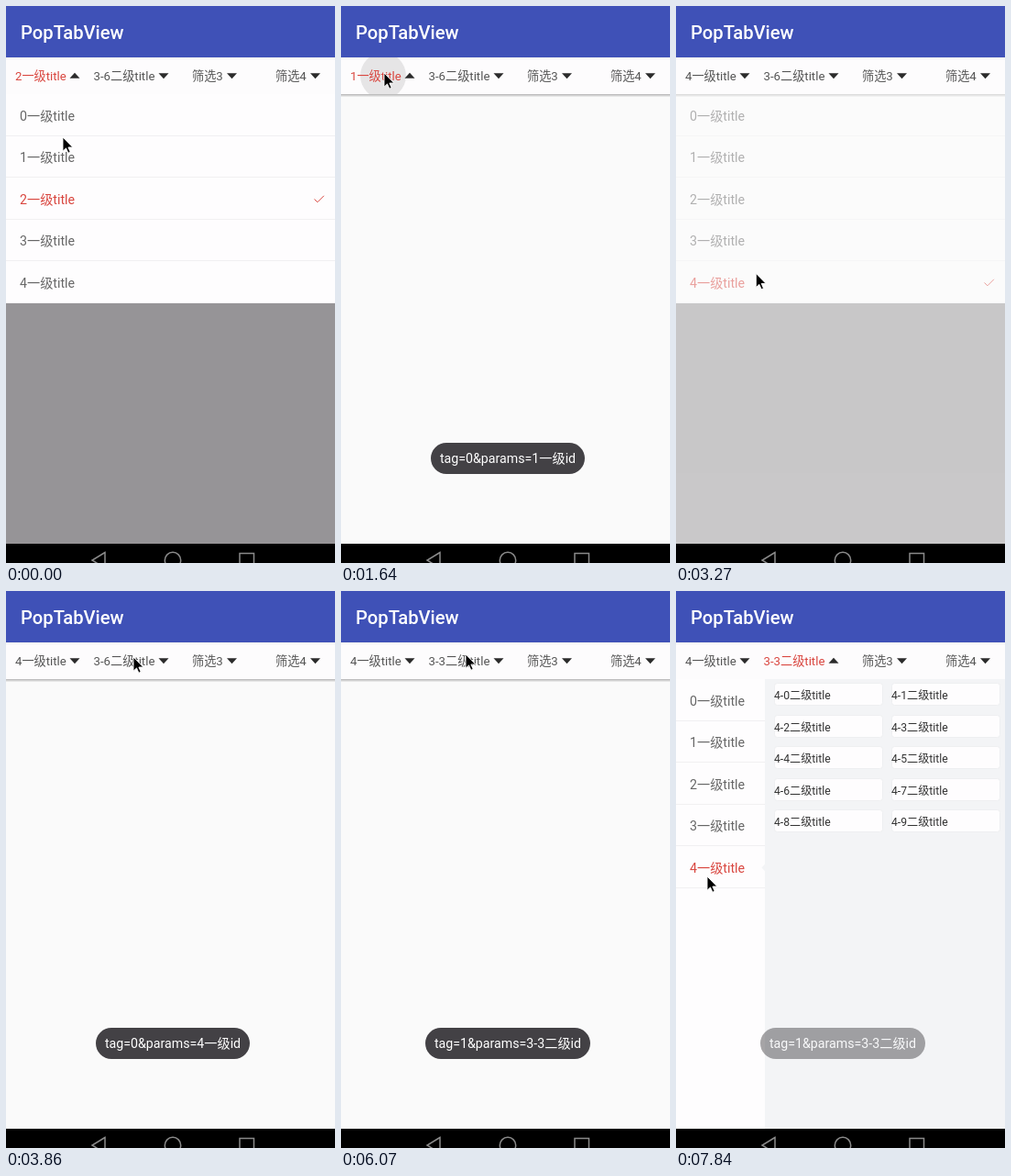
Recreate the animation shown at these times as an HTML page. Size 359x607 px, loop 7990 ms.

```html
<!DOCTYPE html>
<html lang="zh">
<head>
<meta charset="utf-8">
<title>PopTabView</title>
<style>
html, body { margin: 0; width: 100%; height: 100%; overflow: hidden; background: #fafafa; }
svg { display: block; width: 100%; height: 100%; font-family: Roboto, "Noto Sans CJK SC", "Noto Sans CJK", sans-serif; }
</style>
</head>
<body>
<svg id="stage" viewBox="0 0 359 607">
  <defs>
    <linearGradient id="shade" x2="0" y2="1">
      <stop stop-color="#000" stop-opacity=".28"/>
      <stop offset="1" stop-color="#000" stop-opacity="0"/>
    </linearGradient>
    <clipPath id="bar"><rect y="56" width="359" height="40"/></clipPath>
  </defs>
</svg>
<script>
const LOOP = 7990, STEP = 147.85;
const RED = '#d9463f', WHITE = '#fefdfe', LINE = '#f1f0f2', PANEL = '#f3f4f6';
const ROW = 45.5, TOP = 96;
const stage = document.getElementById('stage');

function add(parent, tag, attrs, text) {
  const node = document.createElementNS('http://www.w3.org/2000/svg', tag);
  set(node, attrs);
  if (text) node.textContent = text;
  parent.appendChild(node);
  return node;
}
function set(node, attrs) {
  for (const k in attrs) node.setAttribute(k, attrs[k]);
}
const rect = (p, x, y, width, height, fill, more) =>
  add(p, 'rect', { x, y, width, height, fill, ...more });
const label = (p, x, y, size, fill, text, more) =>
  add(p, 'text', { x, y, 'font-size': size, fill, ...more }, text);
const group = (p = stage) => add(p, 'g', {});
const clamp = v => Math.max(0, Math.min(1, v));
const rowMid = i => TOP + ROW * i + 23.5;

// Column of five first-level rows; returns the text nodes.
function makeList(parent, width) {
  return [0, 1, 2, 3, 4].map(i => {
    rect(parent, 0, Math.floor(TOP + ROW * (i + 1) - 0.5), width, 1, LINE);
    return label(parent, 15, Math.round(TOP + ROW * i + 28.9), 14.2, '#666', i + '一级title');
  });
}
const paintList = (rows, sel) => rows.forEach((r, i) => set(r, { fill: i === sel ? RED : '#666' }));

rect(stage, 0, 0, 359, 607, '#fafafa');
rect(stage, 0, 96, 359, 3.5, 'url(#shade)');

// Single list popup
const single = group();
rect(single, 0, 324, 359, 262, '#969497');
rect(single, 0, 96, 359, 228, WHITE);
const rows = makeList(single, 359);
const check = add(single, 'path', { d: 'M336.5 0l3.4 3.3 7-7', fill: 'none', stroke: RED, 'stroke-width': 1 });

// Two-level popup
const double = group();
rect(double, 0, 96, 359, 490, PANEL);
rect(double, 0, 96, 97, 490, WHITE);
const side = makeList(double, 97);
const notch = add(double, 'path', { d: 'M97.5-4.5L93.5 0l4 4.5z', fill: PANEL });
const cells = Array.from({ length: 10 }, (_, i) => {
  const x = i % 2 ? 235.5 : 107.5, base = Math.round(118.4 + 34.4 * (i >> 1));
  return {
    box: rect(double, x, base - 17.5, 118, 24, WHITE, { rx: 3 }),
    text: label(double, x - 0.5, base, 12.15, '#333')
  };
});

// Header and tabs
rect(stage, 0, 56, 359, 40, '#fdfcfd');
rect(stage, 0, 56, 359, 3, 'url(#shade)', { opacity: 0.2 });
rect(stage, 0, 0, 359, 56, '#3f51b7');
label(stage, 16, 35.5, 20.2, '#fff', 'PopTabView', { 'font-weight': 500 });
const ripple = add(stage, 'circle', { cx: 46, cy: 76, r: 25, opacity: 0.09, 'clip-path': 'url(#bar)' });
const tabs = [[10, 75], [95.5, 172], [203, 246.5], [294, 337.5]].map(([x, ax], i) => ({
  ax,
  text: label(stage, x, 81, 13.2, '#555', '筛选' + (i + 1)),
  arrow: add(stage, 'path', { d: 'M-5.5-2.8h11L0 3.2z', fill: '#2b2b2b' })
}));
function paintTab(i, open, text) {
  const tab = tabs[i];
  if (text) tab.text.textContent = text;
  set(tab.text, { fill: open ? RED : '#555' });
  set(tab.arrow, { transform: `translate(${tab.ax} 76) scale(1 ${open ? -1 : 1})` });
}
paintTab(2, false);
paintTab(3, false);

// Toast
const toast = group();
const pill = rect(toast, 98, 476, 168, 34, '#353337', { rx: 17, opacity: 0.93 });
const note = label(toast, 182, 498.3, 14.2, '#fff', '', { 'text-anchor': 'middle' });

// Navigation bar
rect(stage, 0, 586, 359, 21, '#000');
const nav = add(stage, 'g', { fill: 'none', stroke: '#8a8a8a', 'stroke-width': 1.5 });
add(nav, 'path', { d: 'M108 595.5L94 604l14 8.5z' });
add(nav, 'circle', { cx: 182, cy: 604, r: 8.7 });
add(nav, 'rect', { x: 255, y: 596.5, width: 15.5, height: 15.5 });

const cursor = add(stage, 'path', {
  d: 'M0 0V15.2L3.5 11.9 5.9 17.2 8.2 16.2 5.9 11H10.8Z',
  fill: '#000', stroke: '#fff', 'stroke-width': 0.9
});

const PATH = [
  [150, 62, 143], [450, 71, 160], [760, 71, 160], [1340, 47, 73], [1800, 47, 73],
  [2820, 86, 297], [3200, 86, 297], [3850, 139, 72], [4300, 139, 72],
  [5480, 268, 145], [5600, 268, 145], [6065, 136, 69], [6370, 136, 71],
  [6900, 42, 208], [7050, 42, 210], [7540, 34, 311]
];
function cursorAt(t) {
  const i = PATH.findIndex(p => p[0] > t);
  if (i === 0) return PATH[0].slice(1);
  if (i < 0) return PATH[PATH.length - 1].slice(1);
  const [a, b] = [PATH[i - 1], PATH[i]];
  const u = (t - a[0]) / (b[0] - a[0]), e = u * u * (3 - 2 * u);
  return [a[1] + (b[1] - a[1]) * e, a[2] + (b[2] - a[2]) * e];
}

// Opacity of a popup over its [open, close] spans
const fade = (t, spans) => Math.max(...spans.map(([a, b]) =>
  Math.min(clamp((t - a) / 120), clamp(1 - (t - b) / 120))));
const within = (t, spans) => spans.some(([a, b]) => t >= a && t < b);

const TOASTS = [
  [700, 'tag=0&params=1一级id', 168],
  [3300, 'tag=0&params=4一级id', 168],
  [5640, 'tag=1&params=3-3二级id', 180]
];
function paintToast(t) {
  const shown = TOASTS.filter(x => x[0] <= t).pop();
  set(toast, { opacity: 0 });
  if (!shown) return;
  const age = t - shown[0];
  note.textContent = shown[1];
  set(pill, { x: 182 - shown[2] / 2, width: shown[2] });
  set(toast, { opacity: Math.min(clamp(age / 200), clamp(1 - (age - 2135) / 130)) });
}

function draw(ms) {
  const n = Math.max(0, Math.floor((ms - 3) / STEP));
  const t = n * STEP + 8;

  const first = t < 740 ? 2 : t < 3250 ? 1 : 4;
  const second = t < 5620 ? 6 : 3;
  paintTab(0, within(t, [[0, 740], [1630, 3250]]), first + '一级title');
  paintTab(1, within(t, [[4140, 5620], [6200, LOOP]]), `3-${second}二级title`);
  set(ripple, { visibility: within(t, [[1630, 1900]]) ? 'visible' : 'hidden' });

  set(single, { opacity: fade(t, [[-200, 700], [1720, 3200]]) });
  paintList(rows, first);
  set(check, { transform: `translate(0 ${rowMid(first)})` });

  const parent = t < 6950 ? 3 : t < 7690 ? 2 : 4;
  set(double, { opacity: fade(t, [[4220, 5560], [6240, LOOP + 200]]) });
  paintList(side, parent);
  set(notch, { transform: `translate(0 ${rowMid(parent)})` });
  cells.forEach(({ box, text }, i) => {
    const on = parent === 3 && i === second;
    text.textContent = `${parent}-${i}二级title`;
    set(text, { fill: on ? RED : '#333' });
    set(box, { stroke: on ? '#e2a6a3' : '#eeeff1' });
  });

  paintToast(t);
  set(cursor, { transform: `translate(${cursorAt(t)})` });
}

const start = performance.now();
function tick() {
  draw((performance.now() - start) % LOOP);
  requestAnimationFrame(tick);
}
tick();
</script>
</body>
</html>
```
